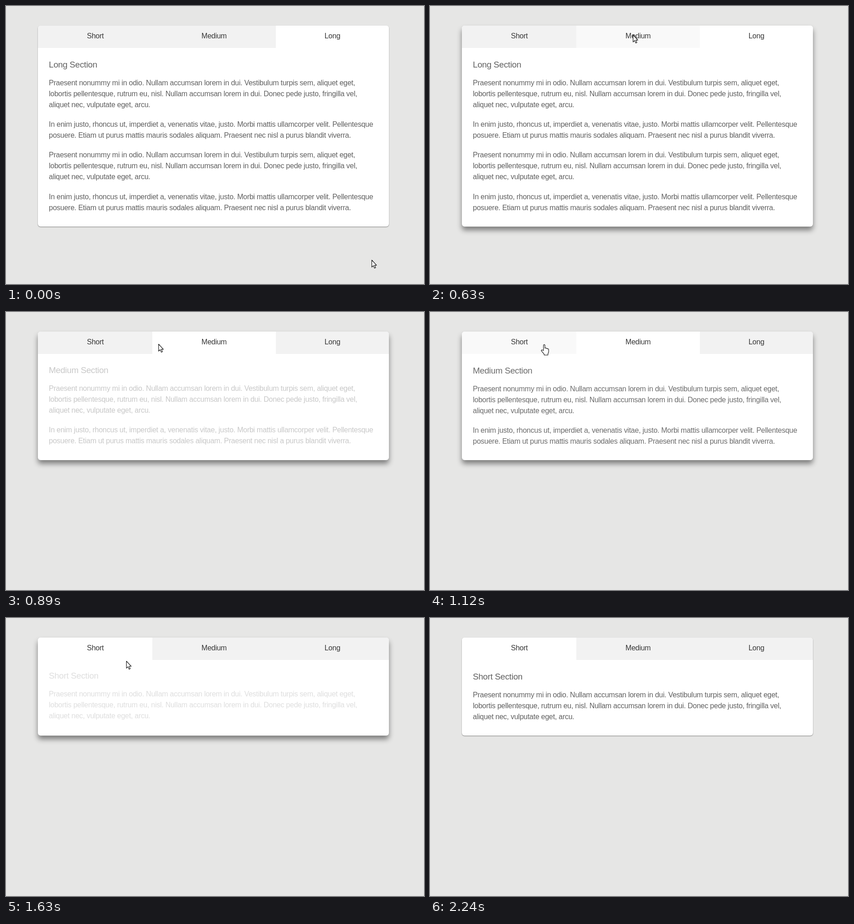
Recreate the animation shown at these times as an HTML page. Size 917x610 px, loop 2580 ms.

```html
<!DOCTYPE html>
<html lang="en">
<head>
<meta charset="utf-8">
<title>Tabs</title>
<style>
html, body { margin: 0; width: 100%; height: 100%; overflow: hidden; background: #e6e6e5; }
body { position: relative; font: 16px/24px "Liberation Sans", Arial, sans-serif; letter-spacing: -.256px; color: #606060; }
#card { position: absolute; left: 70px; top: 43px; width: 770px; border-radius: 6px; background: #fff; overflow: hidden; }
.tab { position: absolute; top: 0; height: 48.5px; line-height: 46px; text-align: center; color: #383838; }
section { position: absolute; left: 24px; top: 74px; width: 740px; white-space: nowrap; }
h3 { margin: 0 0 16px; font-size: 18.72px; font-weight: 400; line-height: 24px; }
p { margin: 0 0 19.2px; }
svg { position: absolute; left: 0; top: 0; width: 100%; height: 100%; }
svg path { fill: #fff; stroke: #111; stroke-width: 1.15; stroke-linejoin: round; }
</style>
</head>
<body>
<div id="card"></div>
<svg>
  <path id="arrow" d="M.5 .5V16L4 12.7 6.4 18.2 8.9 17.1 6.5 11.8H11Z"/>
  <path id="hand" d="M-1 13.5V2.2a1.6 1.6 0 0 1 3.2 0V8.5c.5-1.2 2.8-1 2.8.6.6-1 2.7-.7 2.7.9.7-.8 2.6-.3 2.6 1.3V16c0 2.2-1.6 3.4-1.6 5.2v2.3H.4V21.4L-5.4 14.6c-1.1-1.7.9-3.1 2.2-1.9Z"/>
</svg>
<script>
const LOOP = 2580, SHOW_MEDIUM = 685, SHOW_SHORT = 1480;
const $ = id => document.getElementById(id);
const card = $('card'), arrow = $('arrow'), hand = $('hand');

const paraA = `<p>Praesent nonummy mi in odio. Nullam accumsan lorem in dui. Vestibulum turpis sem, aliquet eget,<br>
lobortis pellentesque, rutrum eu, nisl. Nullam accumsan lorem in dui. Donec pede justo, fringilla vel,<br>
aliquet nec, vulputate eget, arcu.</p>`;
const paraB = `<p>In enim justo, rhoncus ut, imperdiet a, venenatis vitae, justo. Morbi mattis ullamcorper velit. Pellentesque<br>
posuere. Etiam ut purus mattis mauris sodales aliquam. Praesent nec nisl a purus blandit viverra.</p>`;

function add(tag, html) {
  const el = document.createElement(tag);
  el.innerHTML = html;
  card.append(el);
  return el;
}

const tabs = [['Short', 0, 252, paraA, 215], ['Medium', 251, 271, paraA + paraB, 282],
  ['Long', 522, 248, paraA + paraB + paraA + paraB, 441]].map(([name, x, w, text, height]) => {
  const label = add('div', name);
  label.className = 'tab';
  label.style.left = x + 'px';
  label.style.width = w + 'px';
  return { label, height, section: add('section', `<h3>${name} Section</h3>${text}`) };
});

const ramp = (t, start, length) => {
  const k = Math.min(1, Math.max(0, (t - start) / length));
  return k * k * (3 - 2 * k);
};

// Each key is [time, value, ...]; values glide linearly between keys.
function follow(keys, t) {
  const i = keys.findIndex(k => k[0] > t);
  if (i < 0) return keys[keys.length - 1].slice(1);
  const a = keys[i - 1], b = keys[i], k = (t - a[0]) / (b[0] - a[0]);
  return a.slice(1).map((v, j) => v + (b[j + 1] - v) * k);
}

const pointer = [[0, 802, 557], [30, 802, 557], [240, 451, 73], [590, 451, 73], [625, 445, 63], [700, 445, 63],
  [890, 335, 70], [1010, 250, 71], [1430, 250, 71], [1630, 262, 92], [1670, 330, 180], [1780, 712, 528]];

// Grey level of each tab.
const shades = [
  [[0, 241.5], [920, 241.5], [1100, 249], [SHOW_SHORT, 249], [1610, 255]],
  [[0, 241.5], [200, 241.5], [420, 249], [SHOW_MEDIUM, 249], [840, 255], [SHOW_SHORT, 255], [1620, 241.5]],
  [[0, 255], [SHOW_MEDIUM, 255], [840, 241.5]]
];

function draw(t) {
  const active = t < SHOW_MEDIUM ? 2 : t < SHOW_SHORT ? 1 : 0;
  const fade = active === 2 ? 1 : ramp(t, active ? SHOW_MEDIUM : SHOW_SHORT, 520);
  tabs.forEach(({ label, section }, i) => {
    const g = follow(shades[i], t)[0];
    label.style.background = `rgb(${g},${g},${g})`;
    section.style.display = i === active ? 'block' : 'none';
    section.style.opacity = fade;
    section.style.transform = fade < 1 ? `translateY(${-2 * (1 - fade)}px)` : 'none';
  });

  const lift = ramp(t, 80, 300) - ramp(t, 1670, 290);
  card.style.height = tabs[active].height + 'px';
  card.style.boxShadow = `0 ${1 + 7 * lift}px ${2 + 10 * lift}px rgba(0,0,0,.45)`;

  const [x, y] = follow(pointer, t);
  const pointing = t > 220 && t < 625 || t > 920 && t < SHOW_SHORT;
  hand.style.display = pointing ? '' : 'none';
  arrow.style.display = pointing || t >= 1800 ? 'none' : '';
  (pointing ? hand : arrow).setAttribute('transform', `translate(${x} ${y})`);
}

const begin = performance.now();
function tick() {
  draw((performance.now() - begin) % LOOP);
  requestAnimationFrame(tick);
}
tick();
</script>
</body>
</html>
```
